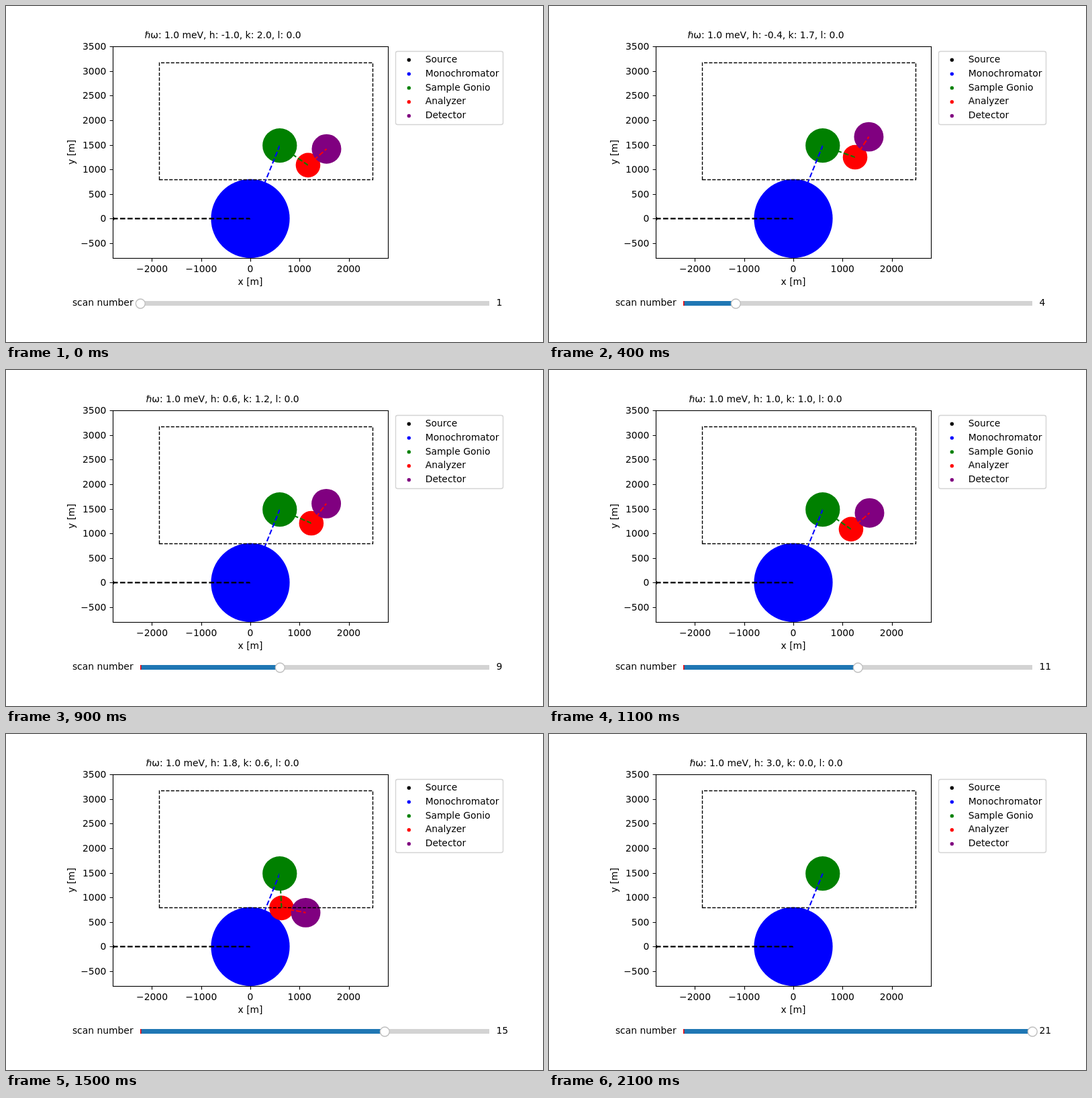
An HTML page with a canvas that plays this animation: 800 px wide and 500 px high, repeating every 2200 ms.

```html
<!DOCTYPE html>
<html lang="en">
<head>
<meta charset="utf-8">
<title>Spectrometer scan</title>
<style>
html, body { margin: 0; width: 100%; height: 100%; overflow: hidden; background: #fff; }
canvas { display: block; width: 800px; height: 500px; }
</style>
</head>
<body>
<canvas id="stage" width="800" height="500"></canvas>
<script>
const ctx = document.getElementById('stage').getContext('2d');
const PT = 100 / 72;
const FONT = 10 * PT + 'px "DejaVu Sans", sans-serif';
const LOOP = 2200;
const RAD = Math.PI / 180;

// Plot area: equal scale on both axes
const BOX = { l: 159, t: 60, r: 569, b: 375 };
const SCALE = 315 / 4300;
const px = x => 364 + x * SCALE;
const py = y => BOX.t + (3500 - y) * SCALE;

// Instrument arms (length) and fixed scattering angles
const MONO_ANGLE = 68.07 * RAD;
const ANA_ANGLE = 75.94 * RAD;
const ARM = { sample: 1600, analyzer: 700, detector: 500 };

const PARTS = [
  ['Source', 'black'],
  ['Monochromator', 'blue'],
  ['Sample Gonio', 'green'],
  ['Analyzer', 'red'],
  ['Detector', 'purple']
];

const step = (from, length, angle) => ({
  x: from.x + length * Math.cos(angle),
  y: from.y + length * Math.sin(angle)
});

function text(s, x, y, align = 'left') {
  ctx.fillStyle = '#000';
  ctx.textAlign = align;
  ctx.fillText(s, x, y);
}

function dot(x, y, r, color) {
  ctx.fillStyle = color;
  ctx.beginPath();
  ctx.arc(x, y, r, 0, 2 * Math.PI);
  ctx.fill();
}

function disc(p, r, color) {
  dot(px(p.x), py(p.y), r * SCALE, color);
}

function setDash(points) {
  const w = points * PT;
  ctx.lineWidth = w;
  ctx.setLineDash([3.7 * w, 1.6 * w]);
}

function beam(a, b, color) {
  ctx.strokeStyle = color;
  setDash(1.5);
  ctx.beginPath();
  ctx.moveTo(px(a.x), py(a.y));
  ctx.lineTo(px(b.x), py(b.y));
  ctx.stroke();
  ctx.setLineDash([]);
}

function drawHall() {
  ctx.strokeStyle = '#000';
  setDash(1);
  ctx.beginPath();
  ctx.moveTo(228.5, 258.5);
  ctx.lineTo(546.5, 258.5);
  ctx.lineTo(546.5, 84.5);
  ctx.lineTo(228.5, 84.5);
  ctx.closePath();
  ctx.stroke();
  ctx.setLineDash([]);
}

function drawInstrument(h, k) {
  const source = { x: -2800, y: 0 };
  const mono = { x: 0, y: 0 };
  const sample = step(mono, ARM.sample, MONO_ANGLE);

  // Momentum transfer on a hexagonal lattice sets the sample angle
  const cos = 1.00448 - 0.4083 * (h * h + h * k + k * k);
  const reachable = cos >= -1;
  let analyzer, detector;
  if (reachable) {
    const angle = MONO_ANGLE - Math.acos(cos);
    analyzer = step(sample, ARM.analyzer, angle);
    detector = step(analyzer, ARM.detector, angle + ANA_ANGLE);
  }

  ctx.save();
  ctx.beginPath();
  ctx.rect(BOX.l, BOX.t, BOX.r - BOX.l, BOX.b - BOX.t);
  ctx.clip();
  dot(px(source.x), py(source.y), 2.7, 'black');
  disc(mono, 800, 'blue');
  disc(sample, 350, 'green');
  if (reachable) {
    disc(analyzer, 250, 'red');
    disc(detector, 300, 'purple');
  }
  drawHall();
  beam(source, mono, 'black');
  beam(mono, sample, 'blue');
  if (reachable) {
    beam(sample, analyzer, 'green');
    beam(analyzer, detector, 'red');
  }
  ctx.restore();
}

function drawAxes() {
  const label = v => String(v).replace('-', '\u2212');
  ctx.strokeStyle = '#000';
  ctx.lineWidth = 0.8 * PT;
  ctx.strokeRect(BOX.l + 0.5, BOX.t + 0.5, BOX.r - BOX.l, BOX.b - BOX.t);
  ctx.beginPath();
  for (let v = -2000; v <= 2000; v += 1000) {
    const x = Math.round(px(v)) + 0.5;
    ctx.moveTo(x, BOX.b + 0.5);
    ctx.lineTo(x, BOX.b + 5.4);
    text(label(v), px(v), 396, 'center');
  }
  for (let v = -500; v <= 3500; v += 500) {
    const y = Math.round(py(v)) + 0.5;
    ctx.moveTo(BOX.l + 0.5, y);
    ctx.lineTo(BOX.l - 4.4, y);
    text(label(v), 149.3, Math.round(py(v) + 5), 'right');
  }
  ctx.stroke();

  text('x [m]', 364, 415, 'center');
  ctx.save();
  ctx.translate(102, 217.5);
  ctx.rotate(-Math.PI / 2);
  text('y [m]', 0, 0, 'center');
  ctx.restore();
}

function drawLegend() {
  ctx.strokeStyle = '#d4d4d4';
  ctx.lineWidth = PT;
  ctx.beginPath();
  ctx.roundRect(580.5, 67.5, 160, 109, 2.8);
  ctx.stroke();
  PARTS.forEach(([name, color], i) => {
    dot(600.3, 80.3 + 20.8 * i, 2.7, color);
    text(name, 624.7, Math.round(84 + 20.8 * i));
  });
}

function drawSlider(n) {
  const x = 200 + 26 * (n - 1);
  ctx.fillStyle = '#d3d3d3';
  ctx.fillRect(200, 439, 520, 7);
  ctx.fillStyle = '#1f77b4';
  ctx.fillRect(200, 439, x - 200, 7);
  ctx.fillStyle = 'red';
  ctx.fillRect(200, 439, 1.5, 7);
  dot(x + 0.3, 443, 5 * PT, '#fff');
  ctx.strokeStyle = '#bfbfbf';
  ctx.lineWidth = PT;
  ctx.stroke();
  text('scan number', 189.6, 446, 'right');
  text(n, 730.4, 446);
}

function drawTitle(n, h, k) {
  const left = h < 0 ? 206.5 : n < 16 ? 208.5 : 209.5;
  text(`\u210f\u03c9: 1.0 meV, h: ${h.toFixed(1)}, k: ${k.toFixed(1)}, l: 0.0`, left, 48);
}

function draw(time) {
  const n = Math.max(1, Math.floor((time % LOOP) / 100));
  const h = (n - 6) / 5;
  const k = (21 - n) / 10;
  ctx.fillStyle = '#fff';
  ctx.fillRect(0, 0, 800, 500);
  ctx.font = FONT;
  drawInstrument(h, k);
  drawAxes();
  drawTitle(n, h, k);
  drawLegend();
  drawSlider(n);
}

const start = performance.now();
function tick() {
  draw(performance.now() - start);
  requestAnimationFrame(tick);
}
tick();
</script>
</body>
</html>
```
